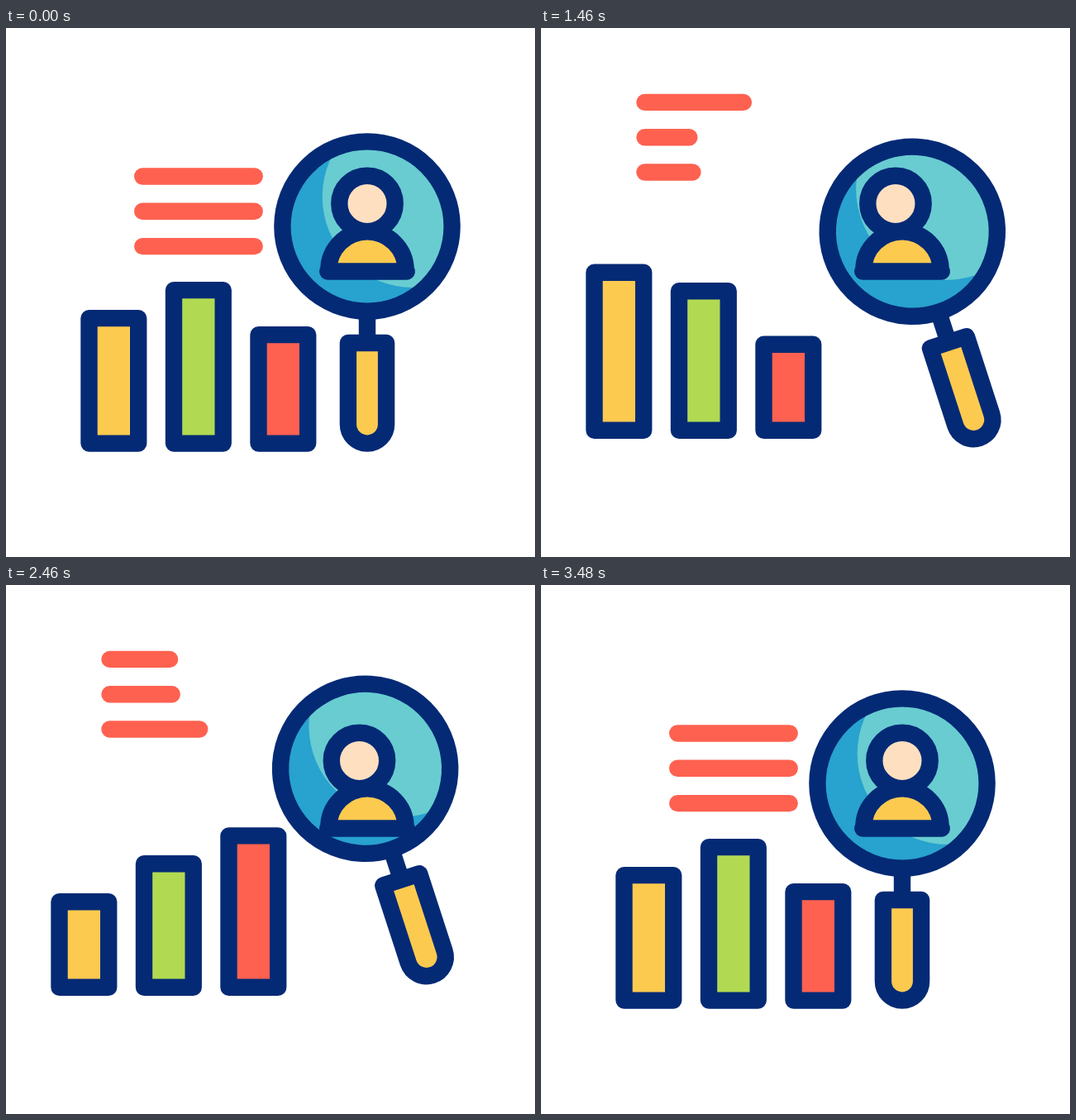
Write an HTML page with a canvas that moves like this. It is 640 by 640 pixels and loops after 3600 ms.

```html
<!DOCTYPE html>
<html lang="en">
<head>
<meta charset="utf-8">
<title>Audience research</title>
<style>
html, body { margin: 0; width: 100%; height: 100%; overflow: hidden; background: #fff; }
canvas { display: block; width: 640px; height: 640px; }
</style>
</head>
<body>
<canvas id="stage" width="640" height="640"></canvas>
<script>
const ctx = document.getElementById('stage').getContext('2d');
const LOOP = 3600, STEP = 20, STROKE = 20.4, FULL_LINE = 135.5, SHORT_LINE = 42.5;
const NAVY = '#042a75', RED = '#ff6150', YELLOW = '#fdca50', GREEN = '#b1da52',
      BLUE = '#28a2ce', TEAL = '#68ccd1', SKIN = '#fedfc0';

// Swings are height offsets reached at even intervals before returning to rest.
const bars = [
  { color: YELLOW, height: 151.5, swings: [47, -24, -48] },
  { color: GREEN, height: 185.5, swings: [-19, 0, -36] },
  { color: RED, height: 131.5, swings: [-33, 20, 52] }
];
// Each text line shrinks and regrows twice, in half-cycles of its own length.
const lines = [
  { start: 405, half: 608 },
  { start: 1030, half: 550 },
  { start: 1000, half: 620 }
];
// Lens stops relative to its rest position.
const lensX = [0, 21.4, -24.4, -2.5, 16];
const lensY = [0, 10.8, 6.6, -18, 20.5];
const headX = [0, -14, 4.3, -9.6, 0];

const clamp = v => Math.min(1, Math.max(0, v));
const smooth = u => u * u * (3 - 2 * u);
const ramp = (t, start, length) => smooth(clamp((t - start) / length));
const mix = (a, b, p) => a + (b - a) * p;

// Eased travel through stops spaced evenly in time.
const travel = (stops, t, start, gap) => stops.slice(1).reduce(
  (value, stop, i) => value + (stop - stops[i]) * ramp(t, start + gap * i, gap), stops[0]);

function strokePath(trace, fill) {
  ctx.beginPath();
  trace();
  if (fill) {
    ctx.fillStyle = fill;
    ctx.fill();
  }
  ctx.stroke();
}

function circle(x, y, r) {
  ctx.arc(x, y, r, 0, Math.PI * 2);
}

function disc(x, y, r, fill) {
  ctx.beginPath();
  circle(x, y, r);
  ctx.fillStyle = fill;
  ctx.fill();
}

function segment(x0, y0, x1, y1, color) {
  ctx.strokeStyle = color;
  strokePath(() => { ctx.moveTo(x0, y0); ctx.lineTo(x1, y1); });
}

function drawLines(t, shift) {
  const x = 165.2 - 39.7 * shift;
  lines.forEach(({ start, half }, i) => {
    const phase = 4 * clamp((t - start) / (4 * half)) % 2;
    const length = mix(FULL_LINE, SHORT_LINE, smooth(1 - Math.abs(1 - phase)));
    const y = 179.5 + 42.3 * i - 89.6 * shift;
    segment(x, y, x + length, y, RED);
  });
}

function drawBars(t, shift) {
  ctx.strokeStyle = NAVY;
  bars.forEach(({ color, height, swings }, i) => {
    const h = height + travel([0, ...swings, 0], t, 800, 550);
    const x = 100.5 + 102.5 * i - 36 * shift, bottom = 502.6 - 15.8 * shift;
    strokePath(() => ctx.rect(x, bottom - h, 59.7, h), color);
  });
}

function drawLens(x, y, angle) {
  ctx.save();
  ctx.translate(x, y);
  ctx.rotate(angle);
  ctx.save();
  ctx.beginPath();
  circle(0, 0, 102);
  ctx.clip();
  disc(0, 0, 103, BLUE);
  disc(55.7, -36, 110, TEAL);
  ctx.restore();

  segment(0, 104, 0, 138, NAVY);
  strokePath(() => {
    ctx.moveTo(-23.1, 141);
    ctx.lineTo(23.1, 141);
    ctx.arc(0, 239.5, 23.1, 0, Math.PI);
    ctx.closePath();
  }, YELLOW);
  strokePath(() => circle(0, 0, 102.6));
  ctx.restore();
}

function drawPerson(x) {
  ctx.strokeStyle = NAVY;
  strokePath(() => circle(x, 212.4, 33.7), SKIN);
  strokePath(() => {
    ctx.moveTo(389.2, 294.5);
    ctx.arc(437, 292.8, 46.6, Math.PI, 0);
    ctx.lineTo(484.8, 294.5);
    ctx.closePath();
  }, YELLOW);
}

function drawSpark(t, x, y, dx, dy) {
  const head = ramp(t, 3000, 200), tail = ramp(t, 3180, 220);
  if (head > tail) {
    segment(x + dx * tail, y + dy * tail, x + dx * head, y + dy * head, YELLOW);
  }
}

function draw(t) {
  const home = ramp(t, 3000, 400), away = 1 - home;
  const shift = ramp(t, 200, 600) - home;
  const tilt = ramp(t, 600, 400) - home;
  const roam = stops => travel(stops, t, 1240, 400) * away;

  ctx.fillStyle = '#fff';
  ctx.fillRect(0, 0, 640, 640);
  ctx.lineWidth = STROKE;
  ctx.lineCap = ctx.lineJoin = 'round';
  drawLines(t, shift);
  drawBars(t, shift);
  drawLens(437 + roam(lensX), 240 + roam(lensY), -tilt * Math.PI / 10);
  drawPerson(437 + roam(headX));
  drawSpark(t, 496.5, 110.5, 1.6, -27.5);
  drawSpark(t, 525.3, 131.5, 24, -16.2);
}

const origin = performance.now();
function tick() {
  const t = (performance.now() - origin) % LOOP;
  draw(Math.floor(t / STEP) * STEP);
  requestAnimationFrame(tick);
}
tick();
</script>
</body>
</html>
```
